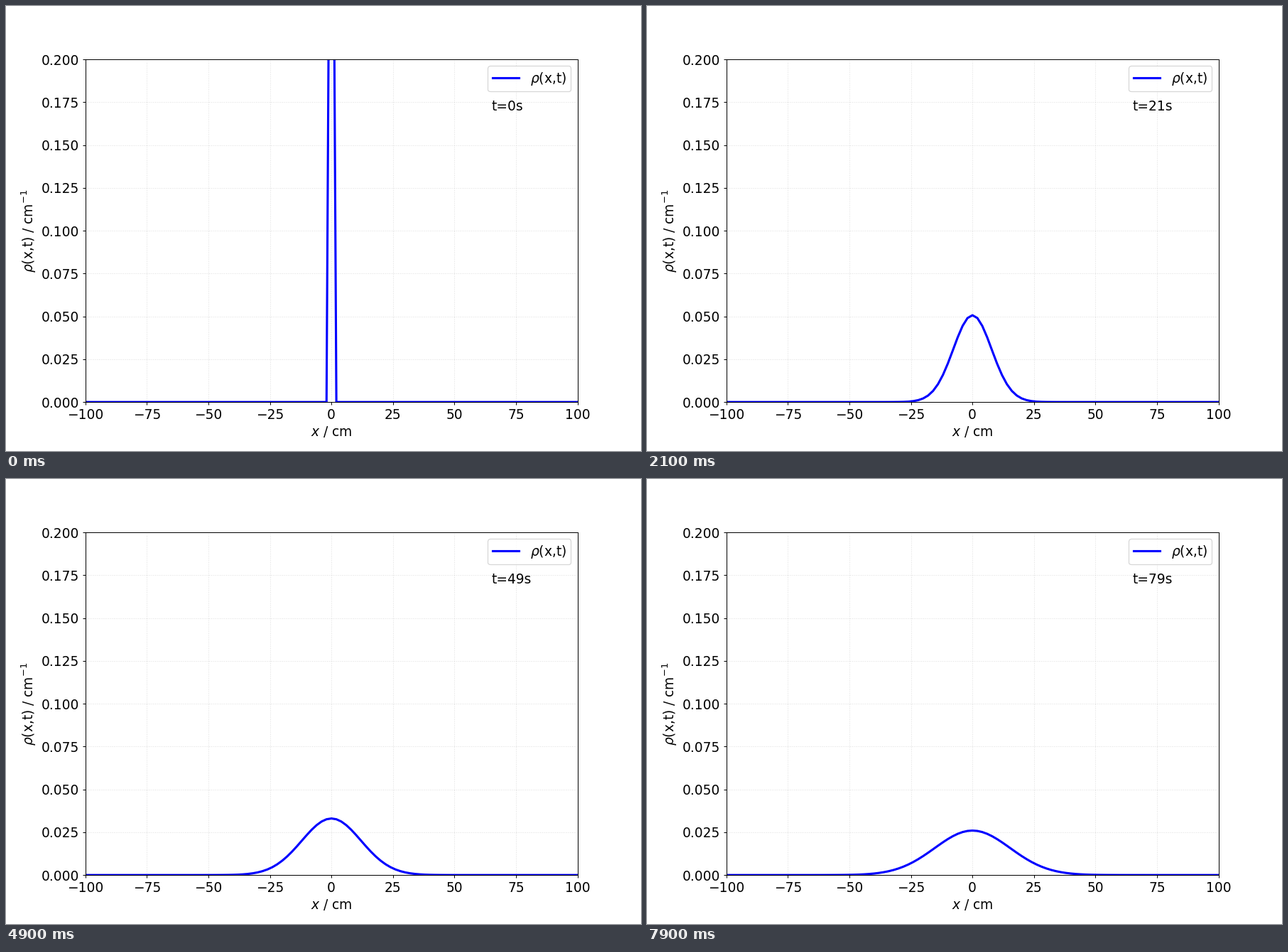
Recreate the animation shown at these times as a matplotlib script. Size 894x626 px, loop 8000 ms.

```python
import numpy as np
import matplotlib.pyplot as plt
from matplotlib.animation import FuncAnimation

DPI = 89.4
FRAMES = 80
DX = 2.0       # cm
RATE = 0.75    # hops per second between neighbouring cells

plt.rcParams.update({"font.size": 15, "font.family": "DejaVu Sans"})

x = np.arange(-100, 100 + DX, DX)
theta = 2 * np.pi * np.fft.fftfreq(len(x))


def density(t):
    """Lattice diffusion of a unit mass that starts in the cell x = 0."""
    decay = np.exp(-RATE * t * (1 - np.cos(theta)))
    return np.fft.fftshift(np.fft.ifft(decay).real) / DX


fig, ax = plt.subplots(figsize=(894.001 / DPI, 626.001 / DPI), dpi=DPI)
line, = ax.plot(x, density(0), color="blue", lw=2.5, label=r"$\rho$(x,t)")
clock = ax.text(65, 0.17, "t=0s")

ax.set_xlim(-100, 100)
ax.set_ylim(0, 0.2)
# Plain-text tick labels sit closer to the axis than mathtext ones.
ax.xaxis.set_major_formatter("{x:.0f}")
ax.yaxis.set_major_formatter("{x:.3f}")
ax.set_xlabel(r"$x$ / cm", labelpad=3)
ax.set_ylabel(r"$\rho$(x,t) / cm$^{-1}$")
ax.grid(linestyle=":", alpha=0.4)
ax.legend(loc="upper right", borderpad=0.35, handletextpad=0.85)


def update(t):
    line.set_ydata(density(t))
    clock.set_text(f"t={t}s")
    return line, clock


anim = FuncAnimation(fig, update, frames=FRAMES, interval=100, repeat=True)
plt.show()
```
